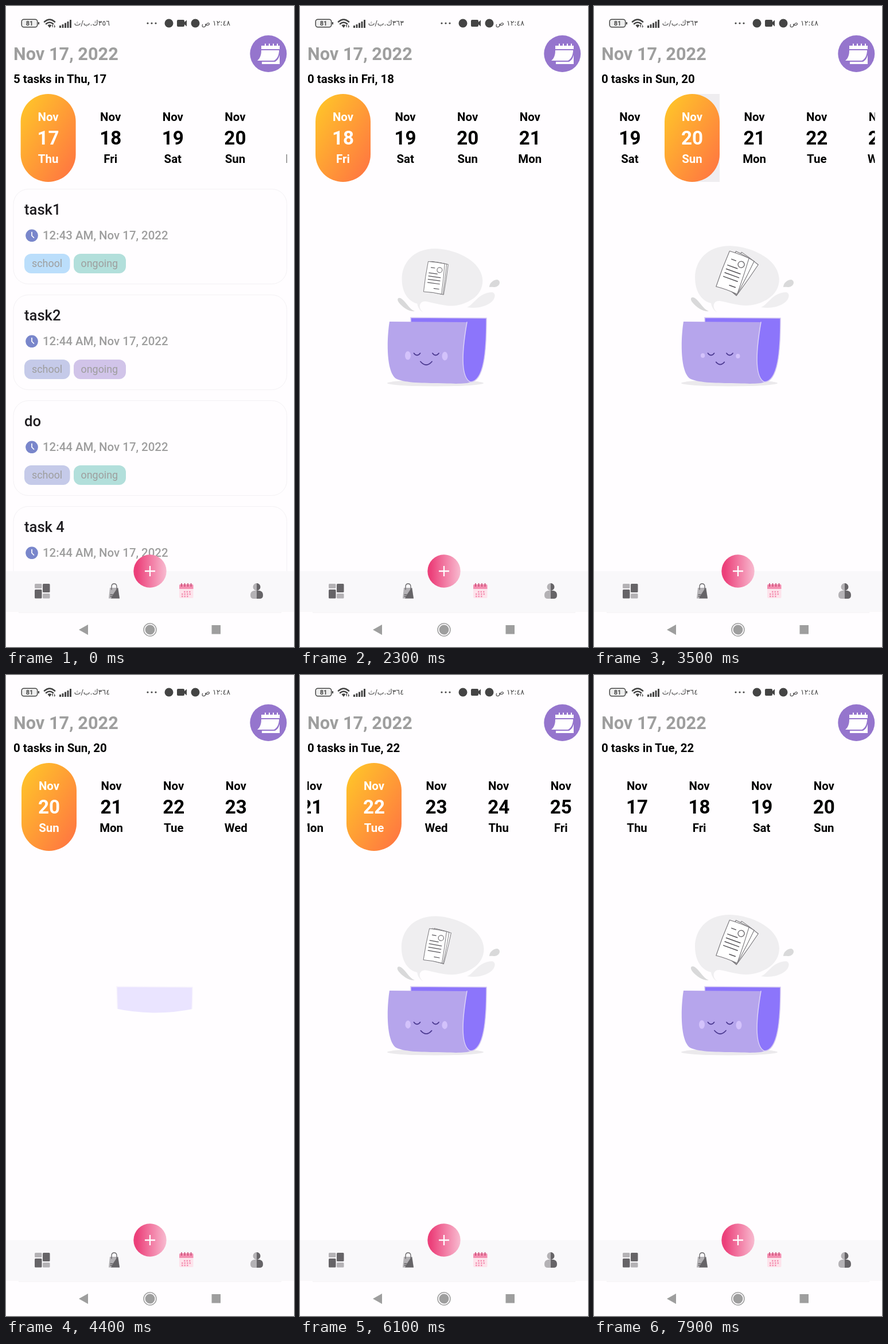
Write an HTML page that moves like this. It is 502 by 1115 pixels and loops after 8 s.

```html
<!DOCTYPE html>
<html lang="en">
<head>
<meta charset="utf-8">
<style>
  html, body { margin: 0; height: 100%; overflow: hidden; background: #fffdff; }
  svg { display: block; width: 100vw; height: 100vh; font: 500 20.45px Roboto, sans-serif; }
  .bold { font-weight: 700; }
  .gray { fill: #9e9e9e; }
  .mid { text-anchor: middle; }
  .ar { font: 12.5px "DejaVu Sans", sans-serif; direction: rtl; }
  .line { fill: none; stroke-linecap: round; }
</style>
</head>
<body>
<svg viewBox="0 0 502 1115">
  <defs>
    <linearGradient id="sun" x1="0" y1="0" x2="1" y2="1">
      <stop stop-color="#ffca28"/><stop offset="1" stop-color="#ff7043"/>
    </linearGradient>
    <linearGradient id="pink">
      <stop offset=".1" stop-color="#ec407a"/><stop offset="1" stop-color="#f8bbd0"/>
    </linearGradient>
    <clipPath id="strip"><path d="M13 150H489.5V310H13Z"/></clipPath>
    <clipPath id="backClip"><path id="backEdge"/></clipPath>
    <clipPath id="frontClip"><rect id="frontEdge" x="140" y="545" width="200"/></clipPath>
  </defs>

  <!-- status bar -->
  <g fill="#444">
    <rect x="27.2" y="23.2" width="27.5" height="13.6" rx="4" fill="#eee" stroke="#444" stroke-width="1.5"/>
    <path d="M56 28h2v4h-2z"/>
    <text class="bold mid" x="41" y="34" font-size="11">81</text>
    <g class="line" stroke="#444" stroke-width="2.6">
      <path d="M67 27.5Q76 19.500 85 27.500M70 31Q76 26 82 31"/>
    </g>
    <path d="M72.500 33.500Q76 31 79.500 33.500L76 38ZM80 34l2-2v6zM84 32v6l2-2z"/>
    <path d="M93 34h3v4h-3zM97.500 32h3v6h-3zM102 29.500h3v8.500h-3zM106.500 27h3v11h-3zM111 24h3v14h-3z"/>
    <text class="ar" id="speed" x="181" y="34"></text>
    <g><circle cx="247" cy="30" r="1.6"/><circle cx="254" cy="30" r="1.6"/><circle cx="261" cy="30" r="1.6"/></g>
    <circle cx="284" cy="30" r="7.500"/>
    <path d="M300 24h9q2 0 2 2v2l4-3.500v11l-4-3.500v2q0 2-2 2h-9q-2 0-2-2v-8q0-2 2-2z"/>
    <circle cx="330" cy="30" r="7.500"/>
    <text class="ar" x="391" y="34">١٢:٤٨ ص</text>
  </g>

  <!-- header -->
  <text class="bold gray" x="13" y="93.500" font-size="30.7">Nov 17, 2022</text>
  <text class="bold" id="count" x="13" y="134"></text>
  <circle cx="457.300" cy="83" r="32" fill="#9575cd"/>
  <g fill="#fff">
    <path d="M445 69h32v6h-32zM445 77H476C476 86 472 93 467 95H438C443 91 445 85 445 77ZM446 97H469C474 94 476 90 477 85V101H446Z"/>
    <path d="M452 65.500v5m7-5v5m7-5v5m7-5v5" stroke="#fff" stroke-width="2"/>
  </g>
  <g clip-path="url(#strip)"><g id="days"></g></g>
  <g id="cards"></g>

  <!-- empty state -->
  <g id="empty">
    <ellipse id="shadow" cx="236" cy="656" rx="84" ry="5.500" fill="#ebe9ec"/>
    <path id="bubble" fill="#efeef0" d="M215 533C205 526 207 512 219 513C245 518 262 525 285 518C310 510 323 495 323 475C322 440 275 418 237 417C195 417 176 445 176 472C176 500 190 514 204 517C205 524 209 530 215 533Z"/>
    <path id="dropL" fill="#d9d9da" d="M200 531C190 532 178 524 171 515C166 508 171 504 177 509C185 515 190 527 200 531Z"/>
    <g id="dropR">
      <path fill="#d9d9da" d="M330 489C330 482 337 476 344 476C350 478 349 485 343 488C338 490 335 488 330 489Z"/>
      <path fill="#efeef0" d="M291 524C303 520 311 498 335 498C343 500 340 511 331 517C318 525 305 526 291 524Z"/>
    </g>
    <g id="back" clip-path="url(#backClip)">
      <path fill="#8c75fb" stroke="#d5c9f3" stroke-width="1.500" d="M193 542L325 543C325 600 321 653 297 654L196 640Z"/>
    </g>
    <g id="papers" stroke="#777579" stroke-width="1.100"></g>
    <g id="front" clip-path="url(#frontClip)">
      <path fill="#b6a5ec" d="M156 549L291 550C284 590 278 645 297 654C290 658 265 657 240 656C210 656 180 655 167 648C150 635 151 580 156 549Z"/>
      <path class="line" stroke="#dcd2f8" stroke-width="1.500" d="M291 550C284 590 278 645 297 654"/>
    </g>
    <g class="line" stroke="#4c3a91" stroke-width="1.800"><path id="eyes"/><path id="mouth"/></g>
    <g fill="#d3c2fb"><ellipse id="cheekL" cy="608"/><ellipse id="cheekR" cy="609"/></g>
  </g>

  <!-- bottom bar -->
  <path fill="#f9f8fa" d="M0 983H502V1054H0Z"/>
  <path fill="#fffdff" d="M0 1054H502V1115H0Z"/>
  <path stroke="#f0eef1" d="M22 1055H480"/>
  <circle cx="251" cy="983" r="28.700" fill="url(#pink)"/>
  <path d="M242 983h18m-9-9v18" stroke="#fff" stroke-width="2.300"/>
  <g fill="#666467">
    <rect x="50" y="1015" width="12.500" height="15.500" rx="1.500"/><rect x="64" y="1005" width="12.500" height="15" rx="1.500"/>
    <g fill="#b4b2b5">
      <rect x="50" y="1005" width="12.500" height="8" rx="1.500"/><rect x="64" y="1022" width="12.500" height="8.500" rx="1.500"/>
      <path d="M181 1012h14.500l2.500 18.500h-19z"/>
    </g>
    <path d="M195 1012l3 18.500h-15Q188 1020 195 1012Z"/>
    <path class="line" stroke="#666467" stroke-width="1.300" d="M184 1015v-5q0-5 4.500-5t4.500 5v5M182 1024h4m-4 3h4"/>
    <path d="M437 1004a6.500 6.500 0 0 1 0 13h5q6 1 6 8 0 6-6 6h-5z"/>
    <path fill="#b4b2b5" d="M437 1004a6.500 6.500 0 0 0 0 13h-5q-6 1-6 8 0 6 6 6h5z"/>
  </g>
  <path fill="#fde3eb" d="M302 1012h24.500v16q0 2-2 2h-20.500q-2 0-2-2z"/>
  <path fill="#f48fb1" d="M304 1006h20.500q2 0 2 2v6h-24.500v-6q0-2 2-2z"/>
  <path stroke="#c2446f" stroke-width="1.500" d="M306 1004v6m5.500-6v6m5.500-6v6m5.500-6v6"/>
  <path stroke="#f48fb1" stroke-width="2.500" stroke-dasharray="2.500 2" d="M310 1019h13M306 1023h17M306 1027h13"/>
  <path class="gray" d="M127 1085l16-9v18zM358.500 1077h15.500v15.500h-15.500z"/>
  <circle class="gray" cx="251" cy="1085" r="8.500"/>
  <circle class="line" cx="251" cy="1085" r="11" stroke="#9e9e9e" stroke-width="1.500"/>
</svg>
<script>
const $ = id => document.getElementById(id);
const set = (id, attrs) => { for (const k in attrs) $(id).setAttribute(k, attrs[k]); };
const clamp = v => Math.max(0, Math.min(1, v));
const smooth = u => (u = clamp(u), u * u * (3 - 2 * u));
const mix = (a, b, u) => a + (b - a) * u;

const LOOP = 8, PITCH = 108.6, CYCLE = 3.57, EMPTY_AT = 0.78;
const week = ['Sun', 'Mon', 'Tue', 'Wed', 'Thu', 'Fri', 'Sat'];
const dayName = d => week[(d - 13) % 7];
// [start, end, distance in days]
const swipes = [[-.035, .5, 1], [2.55, 3.05, 1], [3.38, 3.95, 1], [4.75, 5.337, 1], [5.85, 6.35, 1], [6.85, 7.85, -5]];
// [time, selected day]
const taps = [[-1, 17], [EMPTY_AT, 18], [2.45, 19], [3.32, 20], [4.65, 21], [5.75, 22]];

const days = [];
for (let d = 17; d < 28; d++) days.push(d);
$('days').innerHTML = days.map((d, i) => `<g class="bold mid" transform="translate(${i * PITCH})">
  <path d="M0 153h48v153h-48z" fill="#efedf0"/>
  <rect x="-48" y="153" width="96" height="153" rx="48" fill="url(#sun)"/>
  <text y="200">Nov</text><text y="241" font-size="33.2">${d}</text><text y="273">${dayName(d)}</text></g>`).join('');

const blue = '#bbdefb', teal = '#b2dfdb', indigo = '#c5cae9', violet = '#d1c4e9';
$('cards').innerHTML = [['task1', 43, blue, teal], ['task2', 44, indigo, violet], ['do', 44, indigo, teal], ['task 4', 44, indigo, teal]]
  .map(([name, min, a, b], i) => `<g transform="translate(0 ${i * 184})">
  <rect x="13" y="318.500" width="476.500" height="165" rx="26" fill="none" stroke="#f3f1f4"/>
  <text x="32" y="362.500" font-size="25.6" fill="#1f1d21">${name}</text>
  <circle cx="45" cy="399.300" r="10.800" fill="#7986cb"/>
  <path class="line" stroke="#fff" stroke-width="1.700" d="M45 393.500v6l3.500 3.500"/>
  <text class="gray" x="64" y="406">12:${min} AM, Nov 17, 2022</text>
  <rect x="32" y="431" width="79.500" height="34" rx="12" fill="${a}"/>
  <rect x="118" y="431" width="91" height="34" rx="12" fill="${b}"/>
  <g class="gray" font-size="17.900" font-weight="400"><text x="45" y="454">school</text><text x="130.500" y="454">ongoing</text></g></g>`).join('');

const sheet = '<path fill="#fff" d="M-18-33Q0-34 18-33Q20 0 20 33Q0 31-19 33Q-20 0-18-33Z"/>';
$('papers').innerHTML = `<g>${sheet}</g><g>${sheet}</g>${sheet}
  <path class="line" stroke="#555358" stroke-width="1.500" d="M-10-21h8M-13-9h18M-13-2h26M-13 5h26M-13 12h26M2 23h11"/>
  <circle class="line" cx="9" cy="-18" r="5.500" stroke-width="1.500"/>`;

const scaleAt = (x, y, s) => `translate(${x} ${y}) scale(${s}) translate(${-x} ${-y})`;

function drawEmpty(p) {
  const open = smooth((p - .05) / .35), unfold = smooth((p - .3) / .4);
  const low = mix(580, 660, open);
  set('backEdge', { d: `M190 538H330V${low}Q260 ${low + 15} 190 ${low}Z` });
  set('back', { opacity: clamp(.1 + p * 1.6) });
  set('frontEdge', { height: 115 * unfold });
  set('front', { opacity: clamp(unfold * 3) });
  set('shadow', { opacity: unfold });

  const puff = p > .37 ? 1 - Math.exp(-2.75 * (p - .37)) : 0;
  set('bubble', { transform: scaleAt(213, 533, puff) });
  set('dropL', { transform: scaleAt(200, 531, puff) });
  set('dropR', { transform: scaleAt(291, 524, smooth((p - .9) / .5)) });

  const rise = smooth((p - .95) / .55), fan = smooth((p - 1.4) / 1.2);
  const x = mix(mix(228, 234, rise), 242, fan), y = mix(mix(550, 473, rise), 463.5, fan);
  set('papers', {
    opacity: clamp(rise * 3),
    transform: `translate(${x} ${y}) rotate(${mix(7.5 * rise, 20, fan)}) scale(${mix(.3 + .5 * rise, 1, fan)})`
  });
  const [third, second] = $('papers').children;
  third.setAttribute('transform', `translate(${5 - 5 * fan}) rotate(${mix(2, 17, fan)} 10 33)`);
  second.setAttribute('transform', `translate(${3 - 3 * fan}) rotate(${mix(1, 9, fan)} 10 33)`);

  const wake = smooth((p - .8) / .4), w = 5.5 * wake;
  const eye = cx => `M${cx - w} ${606 - 2 * wake}Q${cx} ${606 + 5 * wake} ${cx + w} ${606 - 2 * wake}`;
  set('eyes', { d: p > .8 ? eye(204) + eye(236.5) : '' });
  const smile = wake * (.85 + .15 * Math.cos((p - 1.5) * Math.PI * 2 / 2.05));
  set('mouth', { d: p > .85 ? `M${220 - 10 * smile} ${622 - 3.5 * smile}Q220 ${622 + 8 * smile} ${220 + 10 * smile} ${622 - 3.5 * smile}` : '' });
  const cheek = { rx: Math.max(0, 5 * smile), ry: Math.max(0, 7.5 * smile * smile) };
  set('cheekL', { cx: 194 - 6 * smile, ...cheek });
  set('cheekR', { cx: 246.5 + 6 * smile, ...cheek });
}

function draw(t) {
  const scroll = swipes.reduce((sum, [a, b, n]) => sum + n * smooth((t - a) / (b - a)), 0);
  const [tapTime, day] = taps.filter(tap => tap[0] <= t).pop();
  set('days', { transform: `translate(${75 - scroll * PITCH})` });
  days.forEach((d, i) => {
    const item = $('days').children[i], on = d === day;
    const [ripple, pill] = item.children;
    item.setAttribute('fill', on ? '#fff' : '#000');
    pill.setAttribute('opacity', +on);
    ripple.setAttribute('opacity', +(on && t - tapTime < .3));
  });
  $('count').textContent = `${day === 17 ? 5 : 0} tasks in ${dayName(day)}, ${day}`;
  $('speed').textContent = (t < .6 ? '٣٥٦' : t < 4.2 ? '٣٦٣' : '٣٦٤') + 'ك.ب/ث';
  const busy = t < EMPTY_AT;
  set('cards', { visibility: busy ? 'visible' : 'hidden' });
  set('empty', { visibility: busy ? 'hidden' : 'visible' });
  if (!busy) drawEmpty((t - EMPTY_AT) % CYCLE);
}

const begin = performance.now();
function tick() {
  draw((performance.now() - begin) / 1000 % LOOP);
  requestAnimationFrame(tick);
}
tick();
</script>
</body>
</html>
```
